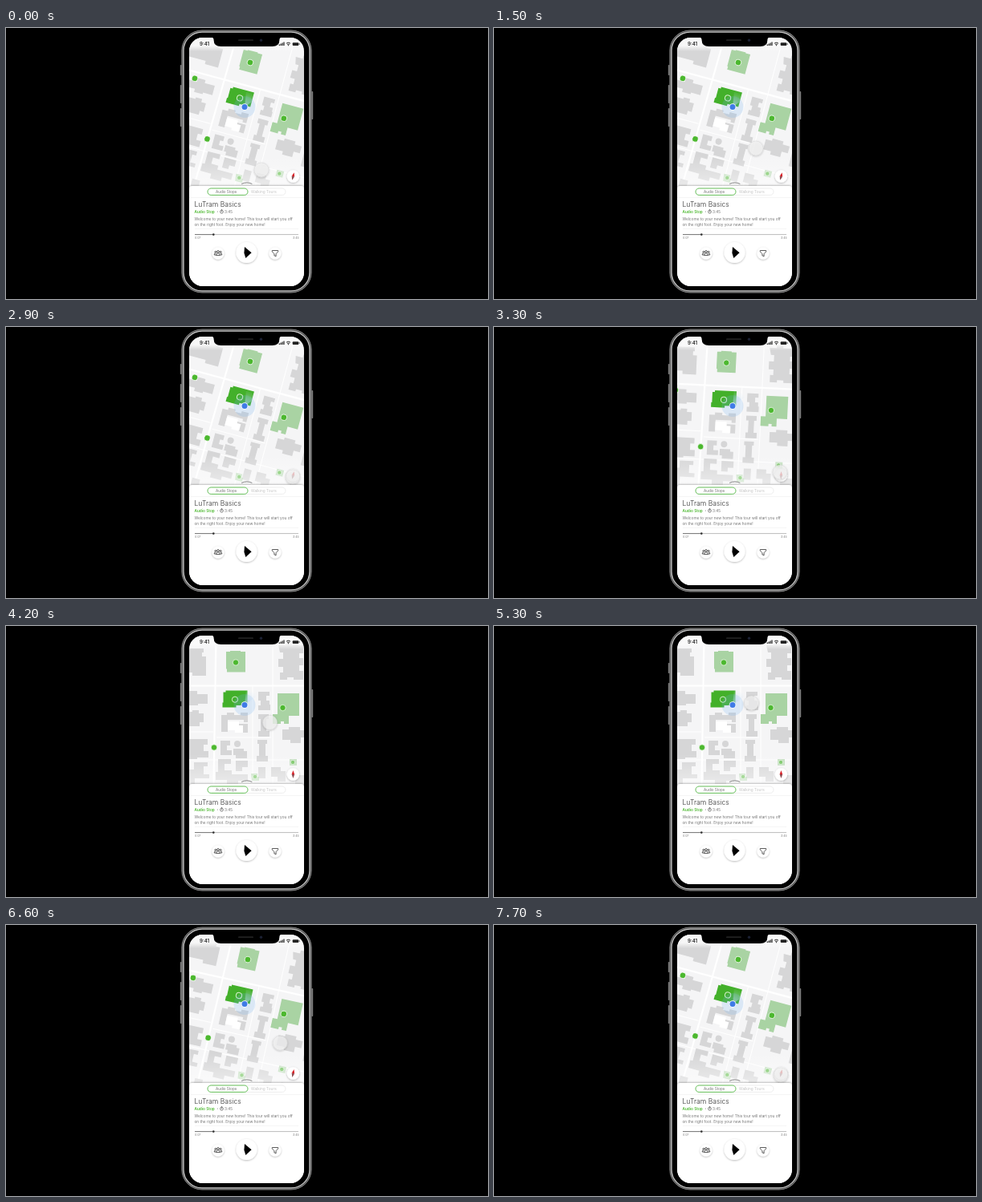
An HTML page that plays this animation: 600x338 px, repeating every 8 s.

```html
<!DOCTYPE html>
<html lang="en">
<head>
<meta charset="utf-8">
<title>Audio tour map</title>
<style>
  html, body { margin: 0; width: 100%; height: 100%; overflow: hidden; background: #000; }
  svg { display: block; width: 100vw; height: 100vh; }
  text { font-family: Inter, "Open Sans", sans-serif; font-size: 4.75px; fill: #757575; }
  .grey { fill: #d6d6d7; }
  .park { fill: #a9d3a3; }
  .stop { fill: #4cb82f; stroke: #fff; stroke-width: .7; }
  .road { fill: none; stroke: #fff; }
  .icon { fill: none; stroke: #333; stroke-width: .8; stroke-linejoin: round; }
</style>
</head>
<body>
<svg viewBox="0 0 600 338">
  <defs>
    <clipPath id="screen"><rect x="228" y="12" width="143" height="310" rx="17"/></clipPath>
    <filter id="shadow" x="-40%" y="-40%" width="180%" height="190%">
      <feDropShadow dx="0" dy=".8" stdDeviation="1" flood-opacity=".3"/>
    </filter>
    <filter id="lift" x="-10%" y="-10%" width="120%" height="120%">
      <feDropShadow dx="0" dy="-.5" stdDeviation="1" flood-opacity=".35"/>
    </filter>
    <linearGradient id="fade" x2="0" y2="1">
      <stop offset="0" stop-color="#fff" stop-opacity="0"/><stop offset="1" stop-color="#fff" stop-opacity=".5"/>
    </linearGradient>
    <linearGradient id="statusFade" x2="0" y2="1">
      <stop offset=".6" stop-color="#fafafa" stop-opacity=".9"/><stop offset="1" stop-color="#fafafa" stop-opacity="0"/>
    </linearGradient>
    <radialGradient id="cone" gradientUnits="userSpaceOnUse" cx="297" cy="98.5" r="20">
      <stop offset=".15" stop-color="#b5d3f2" stop-opacity=".6"/><stop offset="1" stop-color="#d5e8f8" stop-opacity="0"/>
    </radialGradient>
  </defs>

  <rect width="600" height="338"/>
  <g fill="#777">
    <rect x="216.8" y="46" width="2" height="13" rx=".8"/>
    <rect x="216.8" y="71" width="2" height="23" rx=".8"/>
    <rect x="216.8" y="100" width="2" height="23" rx=".8"/>
    <rect x="380.2" y="79" width="2" height="35" rx=".8"/>
  </g>
  <rect x="218.9" y="3" width="161.2" height="327" rx="25" fill="#555" stroke="#888" stroke-width="1"/>
  <rect x="221" y="5.1" width="157" height="322.8" rx="23" stroke="#c6c6c6" stroke-width="1.3"/>

  <g clip-path="url(#screen)">
    <rect x="228" y="12" width="143" height="310" fill="#f5f5f6"/>
    <g id="map">
      <g class="road">
        <path d="M180 74.5H420M262-20L258 230" stroke-width="2.2"/>
        <path d="M332-20V230M307 74V230M180 167H420M180 132H258M262 139H330" stroke-width="1"/>
      </g>
      <g id="buildings" class="grey"></g>
      <path fill="#fff" d="M276 119h14v5h5v9h-10v-3h-9z"/>
      <path class="park" d="M274 32h5v-1h13v1h6v25.5h-23v-4h-1z"/>
      <path class="park" d="M338 84h27v28h-13v10h-6v-3h-4v3h-10v-12h6z"/>
      <path class="park" opacity=".65" d="M305 184h8v4h2v5h-9zM353 166h9v8h-9z"/>
      <path fill="#43b02a" d="M270.5 82.5h3v-2h27v18.5h-14v2.5h-17v-6h1z"/>
      <g id="stops"></g>
    </g>
    <rect x="228" y="160" width="143" height="38" fill="url(#fade)"/>
    <rect x="228" y="12" width="143" height="17" fill="url(#statusFade)"/>

    <circle cx="297" cy="98.5" r="13.5" fill="#6fb0ee" opacity=".2"/>
    <path d="M297 98.5L299 79A20 20 0 0 1 313 87Z" fill="url(#cone)"/>
    <circle cx="297" cy="98.5" r="4.3" fill="#fff"/>
    <circle cx="297" cy="98.5" r="3.5" fill="#3f7be6"/>

    <circle cx="357.4" cy="185" r="7.8" fill="#fff" filter="url(#shadow)"/>
    <g id="needle">
      <path d="M357.4 180l1.8 5h-3.6z" fill="#d8232a"/>
      <path d="M357.4 190l1.8-5h-3.6z" fill="#8d4a50"/>
    </g>
    <circle id="touch" r="9" fill="#f4f4f4" fill-opacity=".72" stroke="#d2d2d2" stroke-opacity=".6" stroke-width=".7" filter="url(#shadow)"/>

    <path d="M228 322V201q0-4 4-4h135q4 0 4 4V322z" fill="#fff" filter="url(#lift)"/>
    <path d="M293.5 194.3q6.5-3 12.5 0" fill="none" stroke="#777" stroke-width=".9" stroke-linecap="round"/>
    <path d="M228 211.5h143M235 250.5h129" stroke="#eee" stroke-width=".6"/>
    <rect x="251" y="200" width="97" height="8.4" rx="4.2" fill="#fff" stroke="#e6e6e6" stroke-width=".7"/>
    <rect x="251" y="200" width="50" height="8.4" rx="4.2" fill="#fff" stroke="#55b947" stroke-width=".9"/>
    <text x="261" y="206" style="font-size:4.6px">Audio Stops</text>
    <text x="305" y="206" style="fill:#c4c4c4">Walking Tours</text>

    <text x="234.5" y="222.7" style="font-size:8.6px;font-weight:300;fill:#333">LuTram Basics</text>
    <text x="234.5" y="230.8" style="font-weight:600;fill:#4cb82f">Audio Stop</text>
    <circle cx="263.3" cy="229" r=".5" fill="#666"/>
    <g class="icon" style="stroke-width:.6"><circle cx="268.5" cy="229.2" r="1.9"/><path d="M268.5 229.2v-1.2M267.8 226.5h1.4"/></g>
    <text x="272" y="230.8">3:45</text>
    <text x="234.5" y="240">Welcome to your new home! This tour will start you off</text>
    <text x="234.5" y="247">on the right foot. Enjoy your new home!</text>

    <path d="M235 257.6h129" stroke="#aaa" stroke-width=".8"/>
    <path d="M235 257.6h23" stroke="#666" stroke-width=".8"/>
    <circle cx="258.3" cy="257.6" r="1.3" fill="#333"/>
    <text x="235" y="262.6" style="font-size:3.5px">0:07</text>
    <text x="364.5" y="262.6" text-anchor="end" style="font-size:3.5px">3:45</text>

    <g fill="#fff" filter="url(#shadow)">
      <circle cx="264" cy="281" r="7.5"/><circle cx="299.5" cy="280" r="13"/><circle cx="335" cy="281" r="7.5"/>
    </g>
    <path d="M297 273l8.6 7.3-7.2 6.7-2-6.2z"/>
    <g class="icon">
      <circle cx="264" cy="279" r="1.4"/><circle cx="260.8" cy="279.4" r="1"/><circle cx="267.2" cy="279.4" r="1"/>
      <path d="M261.5 283.5q0-2.8 2.5-2.8t2.5 2.8zM261.5 283h-2.3q0-2.2 1.8-2.4M266.5 283h2.3q0-2.2-1.8-2.4"/>
      <path d="M331.3 277.5h7.4v1.4l-2.6 2.8v3.1l-2.2-1v-2.1l-2.6-2.8z"/>
    </g>

    <text x="241" y="22.2" style="font-size:6px;font-weight:600;fill:#222">9:41</text>
    <path d="M340.3 22v-1.5M342.2 22v-2.4M344.1 22v-3.4M346 22v-4.4" stroke="#222" stroke-width="1.2"/>
    <path d="M349 19.2q2.5-2 5 0M350.2 20.7q1.3-1 2.6 0" fill="none" stroke="#222" stroke-width="1"/>
    <circle cx="351.5" cy="21.7" r=".6" fill="#222"/>
    <rect x="356.7" y="18.2" width="7.6" height="3.7" rx="1" fill="#222"/>
    <rect x="364.8" y="19.2" width=".7" height="1.7" fill="#222"/>
  </g>

  <path d="M256 11.5q2.6.5 2.6 3.5q0 8 9 8h63.8q9 0 9-8q0-3 2.6-3.5z"/>
  <rect x="289" y="14.2" width="19" height="1.9" rx=".95" fill="#222"/>
  <circle cx="317.5" cy="15.2" r="1.7" fill="#1b2033"/>
</svg>
<script>
const NS = "http://www.w3.org/2000/svg";
const $ = id => document.getElementById(id);
const PIVOT = "304.4 112.5", TILT = 15, LOOP = 8000, STEP = 100, LAST = 7700;

function add(parent, tag, attrs) {
  const el = document.createElementNS(NS, tag);
  for (const key in attrs) el.setAttribute(key, attrs[key]);
  parent.append(el);
}

// Building outlines with north up, grouped by city block.
[
  "M206 28h40v5h-2v5h5v24h-17v-4h-26z",
  "M339 24h9v-4h8v4h14v10h-5v6h5v9h-5v7h5v11h-12v-3h-8v3h-9v-9h4v-7h-6v-10h6v-8h-4zM375 24h18v38h-18z",
  "M228 81h10v4h13v12h-12v2h-11v-4h-17v-9h17zM222 107h10v-2h8v4h6v11h-5v5h-19z",
  "M226 141h25v7h-5v8h6v8h-14v2h-12zM234 170h17v5h-5v10h7v5h-18v12h-13v-9h6v-14h6zM212 177h10v22h-10z",
  "M267 143h12v6h-4v6h6v6h-14zM283 153h13v3h4v9h-14v-4h-3zM284 147a4 4 0 1 1 8 0a4 4 0 1 1-8 0z",
  "M264 166h16v6h-8v8h9v5h20v8h-12v5h-14v-6h-14v-10h3zM286 168h15v8h-7v5h-8zM254 204h10v12h-10z",
  "M268 111h7v-3h9v3h8v-3h9v12h-5v-3h-20v15h-8zM290 122h11v11h-7v-5h-4z",
  "M314 82h14v5h-4v6h4v5h1v7h-15v-6h3v-6h-3z",
  "M314 110h13v6h-3v15h4v7h-14v-7h3v-15h-3z",
  "M313 142h12v5h-2v15h3v7h-14v-7h3v-15h-2z",
  "M344 129h8v-3h14v4h9v9h-8v7h-13v-4h-10zM375 88h22v11h-8v9h8v12h-22zM380 132h14v22h-14z",
  "M330 176h12v5h6v13h-10v-6h-8zM314 176h9v14h-9zM360 186h16v14h-16z"
].forEach(d => add($("buildings"), "path", { d }));

[[286, 45.5], [344.5, 102], [259, 151.5], [224.5, 82.5]]
  .forEach(([cx, cy]) => add($("stops"), "circle", { cx, cy, r: 3.7, class: "stop" }));
[[310, 188], [357, 170]]
  .forEach(([cx, cy]) => add($("stops"), "circle", { cx, cy, r: 2.7, class: "stop", opacity: .65 }));
add($("stops"), "circle", { cx: 285, cy: 91.7, r: 3.6, fill: "#43b02a", stroke: "#d7f0cf", "stroke-width": 1 });

// Touch path: time, x, y.
const TOUCH = [
  [0, 318, 177], [1500, 326, 150], [2200, 357, 187], [3100, 357, 187], [3300, 356, 181],
  [3700, 341, 157], [4500, 323, 104], [5300, 320.5, 96], [5500, 321, 96.5],
  [6100, 341.6, 118.5], [6900, 341, 160], [7400, 357, 187], [8000, 357, 187]
];

const progress = (t, from, to) => Math.min(1, Math.max(0, (t - from) / (to - from)));
const easeInOut = p => (1 - Math.cos(Math.PI * p)) / 2;

function touchAt(t) {
  const i = TOUCH.findIndex(key => key[0] > t);
  const [t0, x0, y0] = TOUCH[i - 1], [t1, x1, y1] = TOUCH[i];
  const p = easeInOut(progress(t, t0, t1));
  return [x0 + (x1 - x0) * p, y0 + (y1 - y0) * p];
}

function tiltAt(t) {
  if (t < 5500) return TILT * (1 - progress(t, 2900, 3600)) ** 2;
  return TILT * easeInOut(progress(t, 5500, 7000));
}

function draw(t) {
  const tilt = tiltAt(t), [x, y] = touchAt(t);
  $("map").setAttribute("transform", `rotate(${tilt} ${PIVOT})`);
  $("needle").setAttribute("transform", `rotate(${tilt} 357.4 185)`);
  $("touch").setAttribute("cx", x);
  $("touch").setAttribute("cy", y);
}

const start = performance.now();
function tick() {
  const t = (performance.now() - start) % LOOP;
  draw(Math.min(LAST, Math.floor(t / STEP) * STEP));
  requestAnimationFrame(tick);
}
tick();
</script>
</body>
</html>
```
